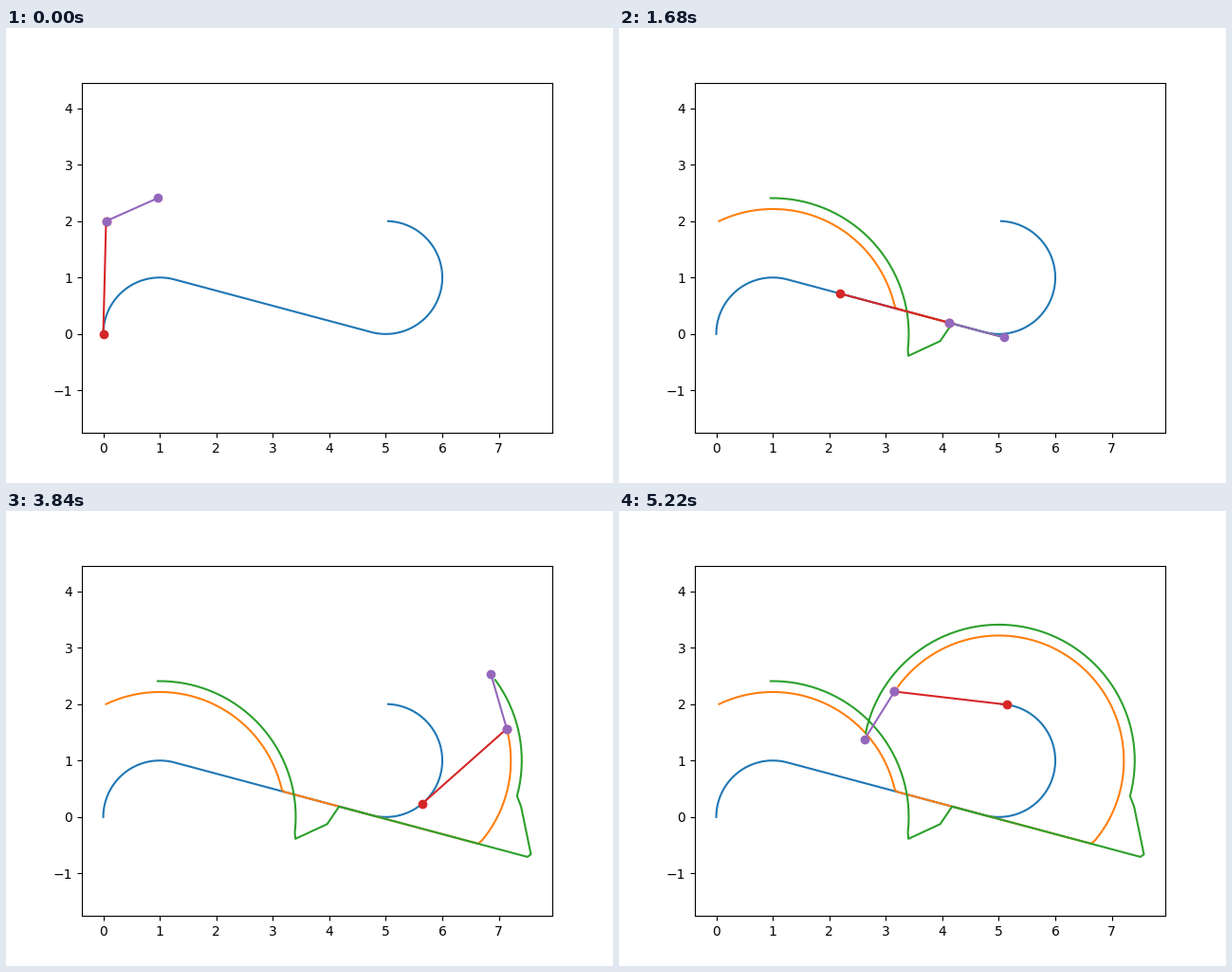
Recreate the animation shown at these times as a matplotlib script. Size 640 by 480 pixels, loop 5.25 s.

```python
import numpy as np
import matplotlib.pyplot as plt
from matplotlib.animation import FuncAnimation

STEP = 0.05
LINKS = (2, 1)


def curve():
    """Right turn, straight, left turn on unit circles around 1 and 5+1j."""
    h = np.arctan2(1, 4) - np.arcsin(2 / np.sqrt(17))
    turn, straight = np.pi / 2 - h, np.sqrt(13)
    total = turn + straight + np.pi - h
    s = np.arange(0, total, STEP)
    u = s - turn
    line = 1 + (1j + u) * np.exp(1j * h)
    left = 5 + 1j - 1j * np.exp(1j * (h + u - straight))
    return np.select([u < 0, u < straight], [1 - np.exp(-1j * s), line], left)


def lead(path, length):
    """Tip of a rod that points from each sample to the next."""
    d = np.diff(path)
    return path[:-1] + length * d / np.abs(d)


base = curve()
joint = lead(base, LINKS[0])
tip = lead(joint, LINKS[1])

fig, ax = plt.subplots(figsize=(6.4, 4.8), dpi=100)


def add(style="-"):
    return ax.plot([], [], style)[0]


def put(artist, z):
    z = np.asarray(z)
    artist.set_data(z.real, z.imag)


road, joint_trail, tip_trail = add(), add(), add()
rod1, rod2 = add("o-"), add("o-")
put(road, base)

# Equal scale: x fits the data with a 5% margin, y is centred
points = np.concatenate([base, joint, tip])
x0, x1 = points.real.min(), points.real.max()
y_mid = (points.imag.min() + points.imag.max()) / 2
width = 1.1 * (x1 - x0)
box = ax.get_position()
half = width * (box.height * 4.8) / (box.width * 6.4) / 2
ax.set_xlim(x0 - 0.05 * (x1 - x0), x1 + 0.05 * (x1 - x0))
ax.set_ylim(y_mid - half, y_mid + half)


def update(i):
    put(joint_trail, joint[:i])
    put(tip_trail, tip[:i])
    put(rod1, [base[i], joint[i]])
    put(rod2, [joint[i], tip[i]])
    return joint_trail, tip_trail, rod1, rod2


anim = FuncAnimation(fig, update, frames=len(tip), interval=30, repeat=True)
plt.show()
```
